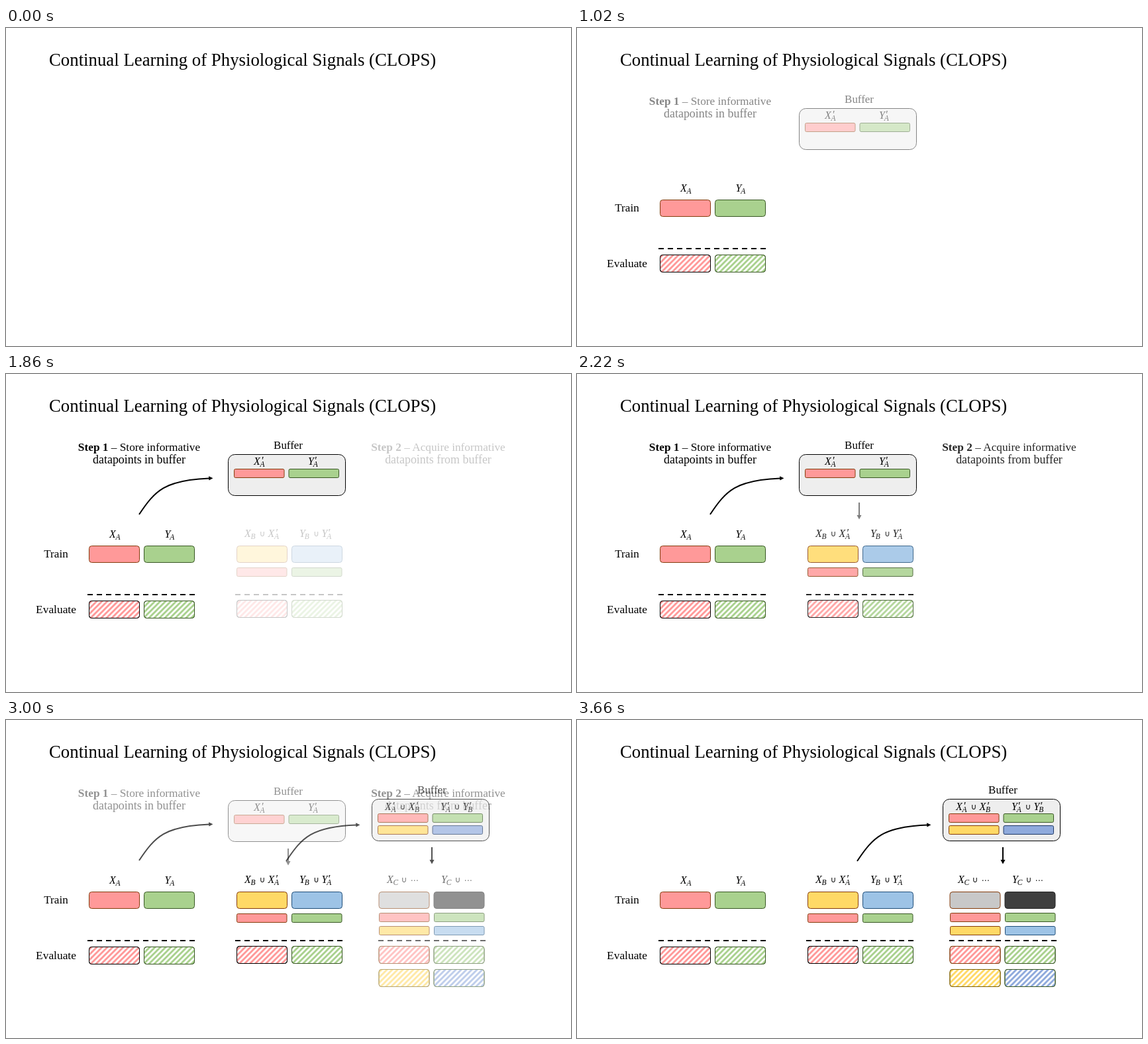
An HTML page for the animation above (3.72 s loop, 853 px wide and 480 px high).

```html
<!DOCTYPE html>
<html lang="en">
<head>
<meta charset="utf-8">
<title>Continual Learning of Physiological Signals</title>
<style>
  html, body { margin: 0; width: 100%; height: 100%; overflow: hidden; background: #fff; }
  svg { display: block; }
  text { font-family: "Liberation Serif", serif; white-space: pre; }
  .mid { text-anchor: middle; }
  .var { font-style: italic; font-size: 16px; }
  .sub { font-style: italic; font-size: 11.5px; }
  .op { font-family: "DejaVu Sans", sans-serif; font-size: 12px; text-anchor: middle; }
</style>
</head>
<body>
<svg id="stage" width="853" height="480" viewBox="0 0 853 480"></svg>
<script>
const LOOP = 3720, STEP = 60;

// fill, outline
const RED = ['#ff9999', '#843c0c'], GREEN = ['#a9d18e', '#385723'];
const YELLOW = ['#ffd966', '#843c0c'], BLUE = ['#9dc3e6', '#1f4e79'];
const GOLD = ['#ffd966', '#7f6000'], INDIGO = ['#8faadc', '#385723'];
const INDIGO_BAR = ['#8faadc', '#1f3864'];
const GREY = ['#c8c8c8', '#843c0c'], DARK = ['#3f3f3f', '#262626'];
const RED_BLACK = ['#ff9999', '#000'];

const hatchId = color => 'h' + color.slice(1);
const hatch = color => `<pattern id="${hatchId(color)}" width="8" height="8" patternUnits="userSpaceOnUse">
  <path d="M-2 2l4-4M-1 9L9-1M6 10l4-4" stroke="${color}" stroke-width="2.9"/></pattern>`;

const rect = (x, y, w, h, r, fill, line) =>
  `<rect x="${x + .5}" y="${y + .5}" width="${w}" height="${h}" rx="${r}" fill="${fill}" stroke="${line}"/>`;
const bar = (x, y, [fill, line]) => rect(x, y, 76, 25, 4, fill, line);
const thin = (x, y, [fill, line]) => rect(x, y, 75.5, 13, 2, fill, line);
const striped = (x, y, [fill, line]) =>
  rect(x, y, 76, 26, 4, '#fff', line) + rect(x, y, 76, 26, 4, `url(#${hatchId(fill)})`, line);

const label = (x, y, size, s) => `<text class="mid" x="${x}" y="${y}" font-size="${size}">${s}</text>`;
const step = (x, n, first, second) =>
  label(x, 116, 17.3, `<tspan font-weight="bold">Step ${n}</tspan> – ${first}`) + label(x, 135, 17.9, second);

// Variable with subscript and optional prime
function sym(x, y, name, sub, prime) {
  const at = x + (name === 'X' ? 9.5 : 7.8);
  return `<text class="var" x="${x}" y="${y}">${name}</text>` +
    `<text class="sub" x="${at}" y="${y + 2.5}">${sub}</text>` +
    (prime ? `<text class="var" x="${at + 1.5}" y="${y - 1}">′</text>` : '');
}
const op = (x, y, s) => `<text class="op" x="${x}" y="${y}">${s}</text>`;

const dashes = x => `<path d="M${x} 333h162" stroke="#000" stroke-width="2" stroke-dasharray="8 6"/>`;
const curve = (x, y) => `<g transform="translate(${x} ${y})">
  <path d="M0 0C24-36 39-52 106-54.5" fill="none" stroke="#000" stroke-width="2"/>
  <path d="M105-57.7L111.5-54.8 105.4-51.5z"/></g>`;
const down = (x, y) => `<path d="M${x} ${y}v20" stroke="#000" stroke-width="2"/>
  <path d="M${x - 3.5} ${y + 19}h7l-3.5 6.5z"/>`;
const box = (x, y, h) => rect(x, y, 177, h, 10, '#eee', '#000') + label(x + 91, y - 8, 16.9, 'Buffer');

// [content, fade-in start, length, fade-out start, length]
const parts = [
  [label(75.5, 277, 17.1, 'Train') + label(75.5, 361, 17.4, 'Evaluate') +
   sym(156, 247, 'X', 'A') + sym(239.5, 247, 'Y', 'A') + dashes(123) +
   striped(125, 342, RED_BLACK) + striped(208, 342, GREEN), 30, 500],

  [bar(125, 259, RED) + bar(208, 259, GREEN), 230, 580],

  [step(201, 1, 'Store informative', 'datapoints in buffer') + box(335, 121, 62) +
   sym(374, 137, 'X', 'A', 1) + sym(456, 137, 'Y', 'A', 1) +
   thin(344, 143, RED) + thin(426.5, 143, GREEN), 780, 500, 2715, 500],

  [curve(201, 212), 1050, 580, 2850, 500],

  [step(652.5, 2, 'Acquire informative', 'datapoints from buffer'), 1735, 570, 2715, 500],

  [sym(360, 246, 'X', 'B') + op(387, 245, '∪') + sym(395.5, 246, 'X', 'A', 1) +
   sym(443, 246, 'Y', 'B') + op(468.5, 245, '∪') + sym(476.5, 246, 'Y', 'A', 1) +
   bar(348, 259, YELLOW) + bar(431, 259, BLUE) +
   thin(348, 292, RED) + thin(431, 292, GREEN) + dashes(346) +
   striped(348, 341, RED_BLACK) + striped(431, 341, GREEN), 1735, 570],

  [down(426, 194), 1940, 560, 2715, 500],

  [sym(575, 246, 'X', 'C') + op(601, 245, '∪') + op(616.5, 246, '⋯') +
   sym(657, 246, 'Y', 'C') + op(682, 245, '∪') + op(697.5, 246, '⋯') +
   bar(562.5, 259, GREY) + bar(645.5, 259, DARK) +
   thin(563, 291, RED) + thin(646, 291, GREEN) +
   thin(563, 311, YELLOW) + thin(646, 311, BLUE) + dashes(562) +
   striped(562.5, 341, RED) + striped(645.5, 341, GREEN) +
   striped(562.5, 376, GOLD) + striped(645.5, 376, INDIGO), 2715, 500],

  [box(552, 119, 63) +
   sym(572, 136, 'X', 'A', 1) + op(599, 135, '∪') + sym(607.5, 136, 'X', 'B', 1) +
   sym(656, 136, 'Y', 'A', 1) + op(681, 135, '∪') + sym(689.5, 136, 'Y', 'B', 1) +
   thin(561, 141, RED) + thin(643.5, 141, GREEN) +
   thin(561, 159, YELLOW) + thin(643.5, 159, INDIGO_BAR) +
   curve(423, 213) + down(643, 192), 2715, 420],
];

const stage = document.getElementById('stage');
stage.innerHTML =
  `<defs>${[RED, GREEN, GOLD, INDIGO].map(c => hatch(c[0])).join('')}</defs>` +
  '<text x="65" y="57" font-size="26.8">Continual Learning of Physiological Signals (CLOPS)</text>' +
  parts.map(p => `<g class="part" opacity="0">${p[0]}</g>`).join('');
const groups = stage.querySelectorAll('.part');

const ramp = (t, start, length) => Math.min(1, Math.max(0, (t - start) / length));

function draw() {
  const t = Math.floor(performance.now() % LOOP / STEP) * STEP;
  parts.forEach(([, start, length, end = LOOP, fade = 1], i) => {
    groups[i].setAttribute('opacity', ramp(t, start, length) * (1 - ramp(t, end, fade)));
  });
  requestAnimationFrame(draw);
}
draw();
</script>
</body>
</html>
```
